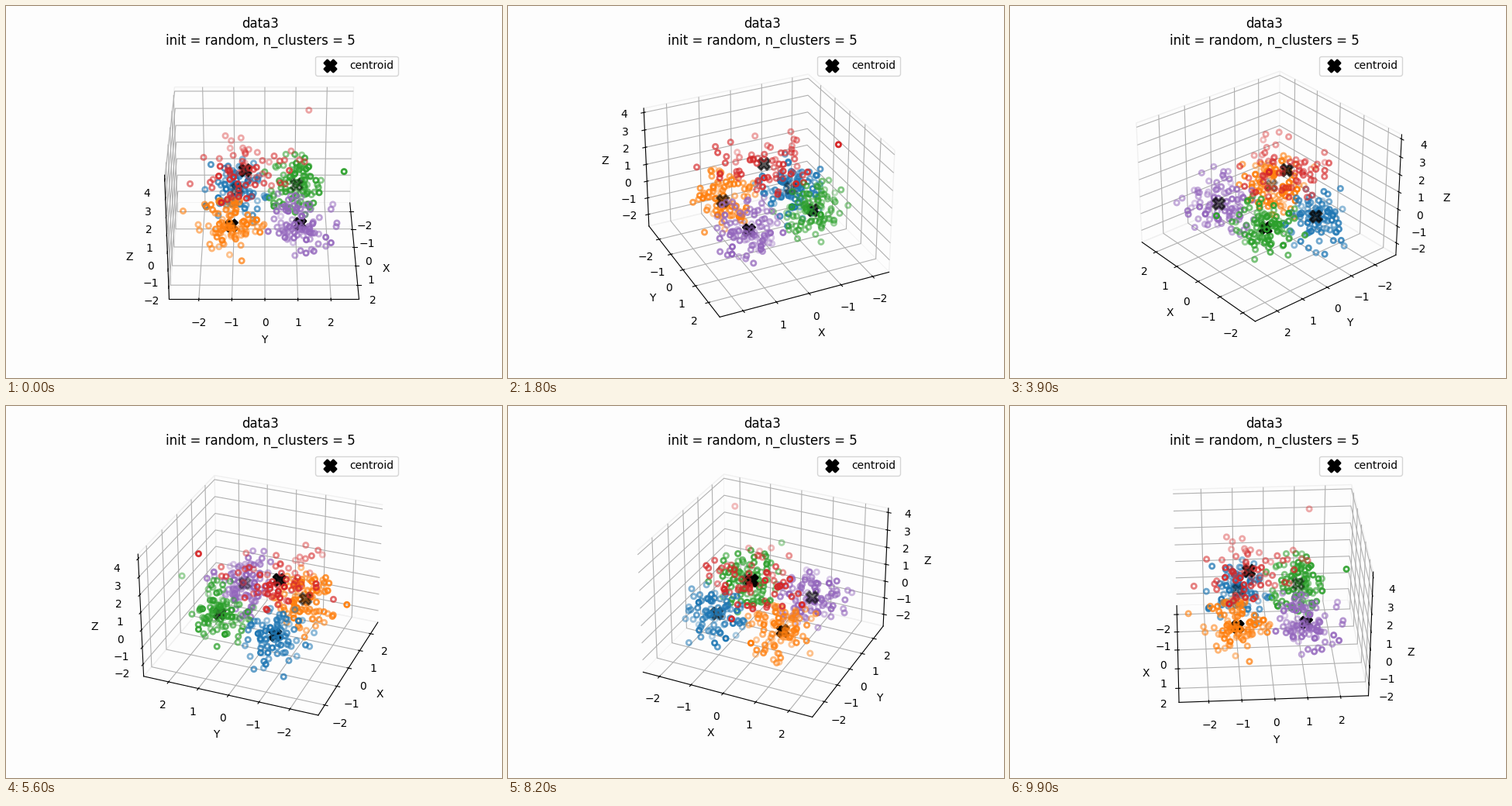
These frames come from a looping animation (640x480 px, 10000 ms). A matplotlib script:

```python
import numpy as np
import matplotlib.pyplot as plt
from matplotlib.animation import FuncAnimation

FRAMES, INTERVAL = 100, 100
BACK = "#fdfdfd"
COLORS = ["tab:blue", "tab:orange", "tab:green", "tab:purple", "tab:red"]
CENTROIDS = np.array([
    (-1.08, -0.90, -0.38),
    (1.03, -1.03, -0.32),
    (-0.94, 1.01, 0.02),
    (1.08, 1.08, -0.17),
    (-0.10, -0.61, 1.71),
])
# Lone points that stand clear of the cloud
STRAYS = np.array([
    (-1.51, 1.39, 3.82),
    (0.70, -2.53, 0.18),
    (-0.48, 2.49, 1.26),
    (-1.74, -1.46, -1.92),
    (1.97, 2.00, -0.28),
])


def blob(rng, center, count, spread, reach=2.6):
    noise = rng.normal(size=(2 * count, 3))
    noise = noise[np.linalg.norm(noise, axis=1) < reach][:count]
    return center + noise * spread


def make_points():
    """Four compact blobs, a looser one on top, and the strays."""
    rng = np.random.default_rng(3)
    blobs = [blob(rng, c, 92, (0.48, 0.48, 0.76)) for c in CENTROIDS[:4]]
    top = blob(rng, CENTROIDS[4], 58, (0.8, 0.75, 0.6))
    return np.vstack(blobs + [top, STRAYS])


def nearest(points):
    gaps = points[:, None, :] - CENTROIDS
    return np.argmin((gaps ** 2).sum(axis=2), axis=1)


fig = plt.figure(figsize=(6.4, 4.8), dpi=100, facecolor=BACK)
ax = fig.add_subplot(projection="3d", facecolor=BACK)

points = make_points()
labels = nearest(points)
for k, color in enumerate(COLORS):
    ax.scatter(*points[labels == k].T, s=20, linewidths=2,
               facecolors="none", edgecolors=color)
ax.scatter(*CENTROIDS.T, s=120, linewidths=2, marker="X", color="black",
           label="centroid")

ax.set(xlim=(-2.525, 2.695), ylim=(-2.90, 2.85), zlim=(-2.72, 4.24),
       xticks=range(-2, 3), yticks=range(-2, 3), zticks=range(-2, 5),
       xlabel="X", ylabel="Y", zlabel="Z")
for axis in (ax.xaxis, ax.yaxis, ax.zaxis):
    axis.set_pane_color(BACK)
    axis.pane.set_edgecolor("#f0f0f0")
ax.set_title("data3\ninit = random, n_clusters = 5")
ax.legend(loc="upper right", facecolor=BACK)


def update(i):
    ax.view_init(elev=30, azim=360 * i / FRAMES)
    return ()


anim = FuncAnimation(fig, update, frames=FRAMES, init_func=lambda: update(0),
                     interval=INTERVAL, repeat=True, repeat_delay=0)
plt.show()
```
